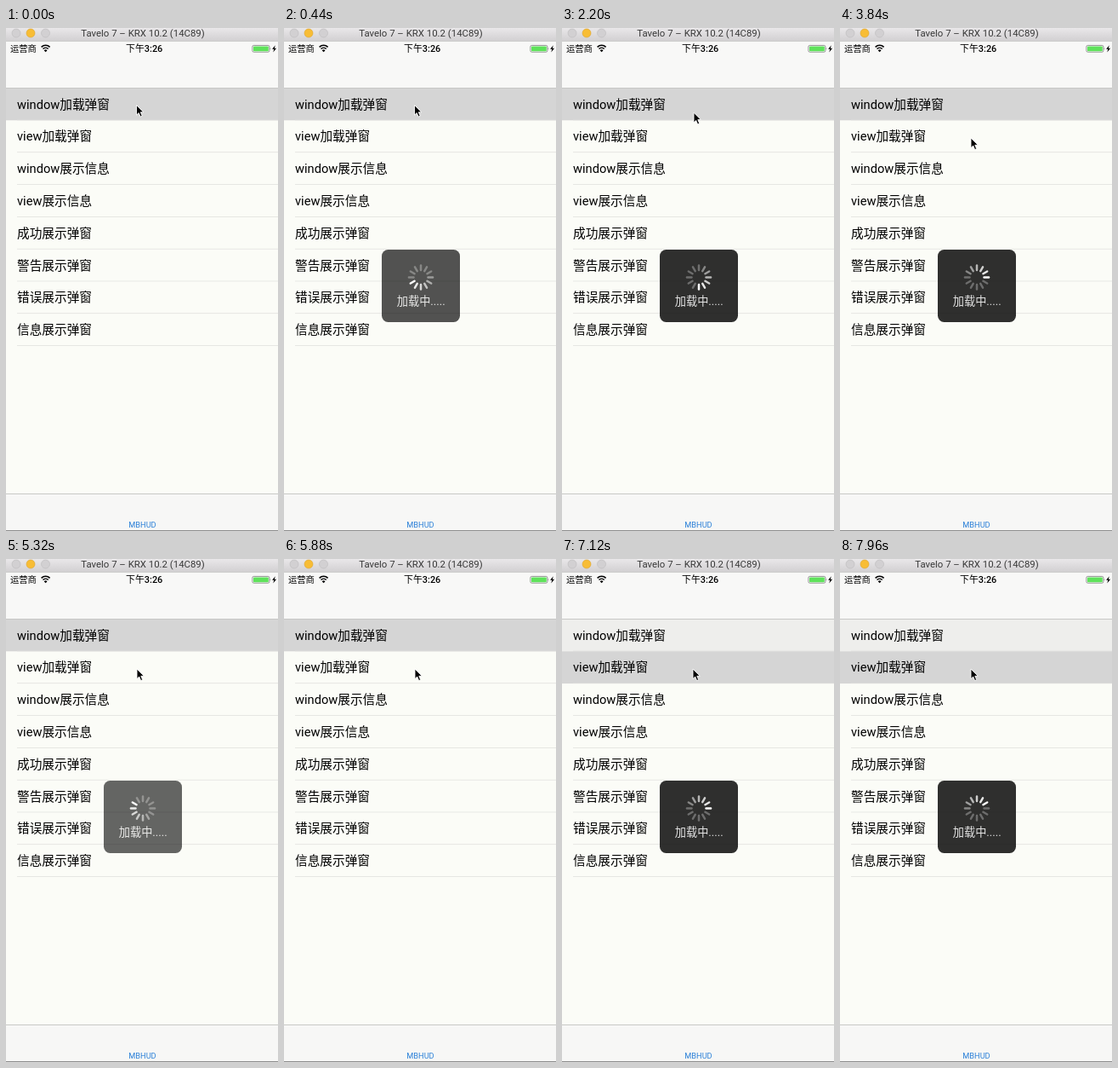
Animation, 320 px wide and 590 px high, one loop 8000 ms. Source, as an HTML page:

```html
<!DOCTYPE html>
<html lang="zh-CN">
<head>
<meta charset="utf-8">
<title>MBHUD</title>
<style>
  html, body { margin: 0; width: 100%; height: 100%; overflow: hidden; }
  svg { display: block; width: 100%; height: 100%; }
  text { font-family: Roboto, "Noto Sans CJK SC", "Noto Sans CJK", sans-serif; }
  .mid { text-anchor: middle; }
</style>
</head>
<body>
<svg viewBox="0 0 320 590">
  <defs>
    <linearGradient id="chrome" x2="0" y2="1">
      <stop stop-color="#e9e7e9"/><stop offset="1" stop-color="#d2d0d2"/>
    </linearGradient>
  </defs>
  <rect width="320" height="590" fill="#fbfcf7"/>

  <!-- Window title -->
  <rect width="320" height="15" fill="url(#chrome)"/>
  <g stroke-width=".6">
    <circle cx="12" cy="6" r="5" fill="#d2d0d2" stroke="#bcbabc"/>
    <circle cx="29" cy="6" r="5" fill="#f8bd35" stroke="#dca32c"/>
    <circle cx="46.5" cy="6" r="5" fill="#d2d0d2" stroke="#bcbabc"/>
  </g>
  <text class="mid" x="161" y="10.3" font-size="11.4" fill="#383838">Tavelo 7 – KRX 10.2 (14C89)</text>

  <!-- Status and navigation bars -->
  <rect y="15" width="320" height="55.5" fill="#f8f8f7"/>
  <rect y="15" width="320" height=".7" fill="#bbb"/>
  <text x="5" y="28" font-size="10.3">运营商</text>
  <g fill="none" stroke="#000" stroke-width="1.6">
    <path d="M41.6 22.4a7 7 0 0 1 10 0M43.5 24.5a4.4 4.4 0 0 1 6.2 0"/>
  </g>
  <path d="M46.6 28.2l-1.9-2a2.7 2.7 0 0 1 3.8 0z"/>
  <text class="mid" x="162.7" y="28" font-size="10.9" font-weight="500">下午3:26</text>
  <rect x="289.9" y="20.4" width="20" height="7.8" rx="1.6" fill="#fff" stroke="#666" stroke-width=".7"/>
  <rect x="291" y="21.4" width="17.8" height="5.8" rx=".8" fill="#5fe25b"/>
  <path d="M310.7 22.8q1.3 1.5 0 3z" fill="#666"/>
  <path d="M316.8 20.2l-3.7 4.6h2.2l-1 3.8 3.8-4.9h-2.3z"/>

  <g id="rows"></g>
  <rect y="70" width="320" height="1" fill="#c8c8c6"/>

  <!-- Tab bar -->
  <rect y="546" width="320" height="43" fill="#f7f7f6"/>
  <rect y="546" width="320" height="1" fill="#c8c8c6"/>
  <text class="mid" x="160.5" y="586.2" font-size="9.2" fill="#2b80d8">MBHUD</text>
  <rect y="589" width="320" height="1" fill="#8e8e8e"/>

  <g id="hud">
    <rect x="115" y="260" width="92" height="85" rx="7.5" fill="#000" fill-opacity=".81"/>
    <g id="spinner" transform="translate(161 292.5)"></g>
    <text class="mid" x="161.3" y="325" font-size="13.2" fill="#e6e6e6">加载中.....</text>
  </g>
  <path id="cursor" d="M0 0V11.6L2.7 9.1 4.6 13.6 6.7 12.7 4.8 8.3H8.4Z" stroke="#fff" stroke-width=".9"/>
</svg>
<script>
const LOOP = 8000, FADE = 300, ROW_TOP = 70.5, ROW_HEIGHT = 37.8;
const SPOKES = 12, SPIN = 940;
const SECOND_TAP = 6600, SECOND_SHOW = 6740;
const labels = ['window加载弹窗', 'view加载弹窗', 'window展示信息', 'view展示信息',
  '成功展示弹窗', '警告展示弹窗', '错误展示弹窗', '信息展示弹窗'];
const byId = id => document.getElementById(id);

function add(parent, tag, attrs, text = '') {
  const node = document.createElementNS(parent.namespaceURI, tag);
  for (const key in attrs) node.setAttribute(key, attrs[key]);
  node.textContent = text;
  return parent.appendChild(node);
}

const rows = labels.map((label, i) => {
  const y = ROW_TOP + i * ROW_HEIGHT, group = byId('rows');
  const back = add(group, 'rect', { y, width: 320, height: ROW_HEIGHT, fill: 'none' });
  add(group, 'rect', { x: 13, y: y + ROW_HEIGHT - .7, width: 307, height: .7, fill: '#dededb' });
  add(group, 'text', { x: 13, y: y + 24.1, 'font-size': 14.67 }, label);
  return back;
});

const spokes = Array.from({ length: SPOKES }, (_, i) => add(byId('spinner'), 'rect', {
  x: -1.25, y: -15.3, width: 2.5, height: 8, rx: 1.25, fill: '#fff',
  transform: `rotate(${i * 360 / SPOKES})`
}));

// Eased progress from 0 to 1
function ease(t, start, duration) {
  const p = Math.min(1, Math.max(0, (t - start) / duration));
  return p * p * (3 - 2 * p);
}

function draw(t) {
  const tapped = t >= SECOND_TAP;
  rows[0].setAttribute('fill', tapped ? '#eeeeec' : '#d5d5d5');
  rows[1].setAttribute('fill', tapped ? '#d5d5d5' : 'none');

  byId('hud').setAttribute('opacity',
    ease(t, 220, FADE) - ease(t, 5220, FADE) + ease(t, SECOND_SHOW, FADE));

  const spinStart = t < SECOND_SHOW ? 715 : 6854;
  const head = Math.floor((t - spinStart) / SPIN * SPOKES);
  spokes.forEach((spoke, i) => {
    const age = ((head - i) % SPOKES + SPOKES) % SPOKES;
    spoke.setAttribute('opacity', Math.max(.3, 1 - age * .115));
  });

  const move = ease(t, 2040, 520);
  const x = 153.5 + 1.5 * ease(t, 2040, 160) - ease(t, 2300, 260);
  byId('cursor').setAttribute('transform', `translate(${x} ${90.5 + 38.5 * move})`);
}

function tick() {
  draw(performance.now() % LOOP);
  requestAnimationFrame(tick);
}
tick();
</script>
</body>
</html>
```
